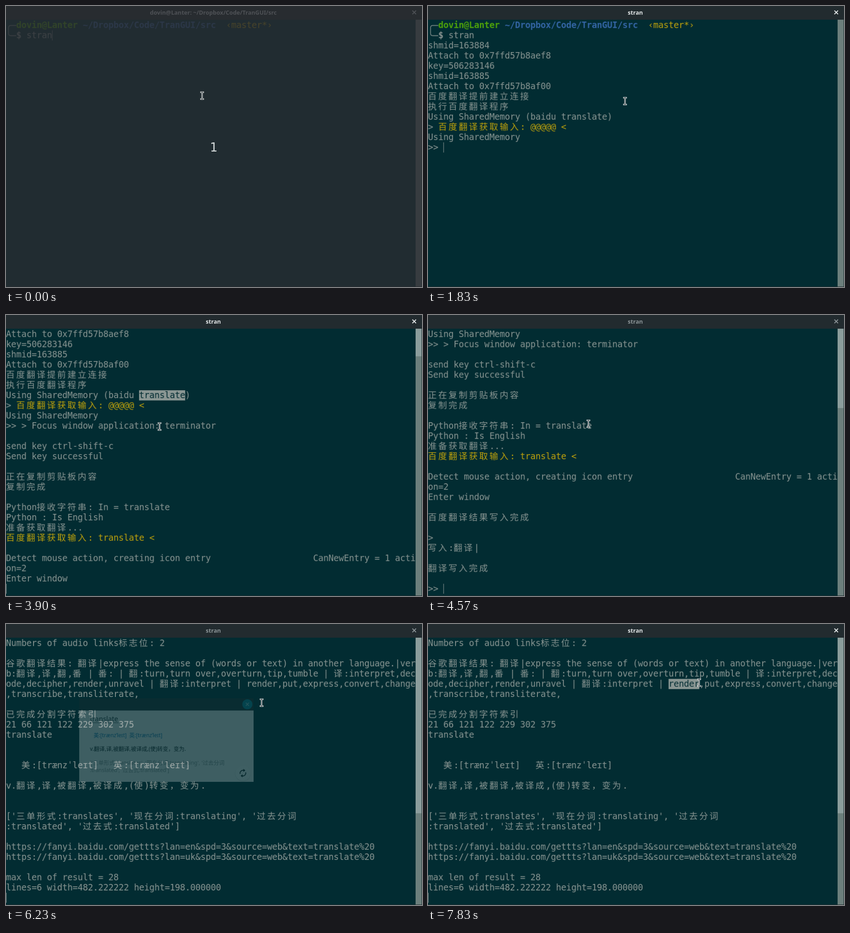
Recreate the animation shown at these times as an HTML page with a canvas. Size 909 by 616 pixels, loop 8000 ms.

```html
<!DOCTYPE html>
<html lang="en">
<head>
<meta charset="utf-8">
<title>Terminal translation</title>
<style>
html, body { margin: 0; width: 100%; height: 100%; overflow: hidden; background: #022c32; }
canvas { display: block; width: 909px; height: 616px; }
</style>
</head>
<body>
<canvas id="stage" width="909" height="616"></canvas>
<script>
const LOOP = 8000, ROWS = 26, COLS = 80;
// The terminal grid is laid out in whole pixels, then scaled slightly onto the stage.
const CELL_W = 11, CELL_H = 22, BASELINE = 17, SIZE = 18.67;
const SCALE_X = 909 / 894, SCALE_Y = 616 / 607, GRID_TOP = 31;
const BG = '#022c32', FG = '#8a9693', GREEN = '#4ea30a', BLUE = '#3465a4', YELLOW = '#c0a30c', BAR = '#222b2f';
const MONO = '"DejaVu Sans Mono", monospace';
const CJK = '"Noto Sans CJK SC", "Noto Sans CJK", sans-serif';
const UI = '"Noto Sans", "Noto Sans CJK SC", sans-serif';
const POPUP = { x: 126, y: 147, w: 449, h: 215 };

function makeLayer(width, height) {
  return Object.assign(document.createElement('canvas'), { width, height }).getContext('2d');
}

const stage = document.getElementById('stage').getContext('2d');
const grid = makeLayer(COLS * CELL_W, ROWS * CELL_H);
const popup = makeLayer(POPUP.w, POPUP.h);
let ctx = stage;

// A line is a string or a list of [text, color, weight].
const lines = [
  [['  '], ['dovin@Lanter ', GREEN, 'bold'], ['~/Dropbox/Code/TranGUI/src', BLUE, 'bold'], ['  ‹master*›', YELLOW]],
  [['  $', FG, 'bold'], [' stran']],
  'shmid=163884',
  'Attach to 0x7ffd57b8aef8',
  'key=506283146',
  'shmid=163885',
  'Attach to 0x7ffd57b8af00',
  '百度翻译提前建立连接',
  '执行百度翻译程序',
  'Using SharedMemory (baidu translate)',
  [['> '], ['百度翻译获取输入: @@@@@ <', YELLOW]],
  'Using SharedMemory',
  '>> > Focus window application: terminator',
  '',
  'send key ctrl-shift-c',
  'Send key successful',
  '',
  '正在复制剪贴板内容',
  '复制完成',
  '',
  'Python接收字符串: In = translate',
  'Python : Is English',
  '准备获取翻译...',
  [['百度翻译获取输入: translate <', YELLOW]],
  '',
  'Detect mouse action, creating icon entry'.padEnd(60) + 'CanNewEntry = 1 acti',
  'on=2',
  'Enter window',
  '',
  '百度翻译结果写入完成',
  '',
  '>',
  '写入:翻译|',
  '',
  '翻译写入完成',
  '',
  '>> ',
  ...Array(13).fill(''),
  'Numbers of audio links标志位: 2',
  '',
  '谷歌翻译结果: 翻译|express the sense of (words or text) in another language.|ver',
  'b:翻译,译,翻,番 | 番: | 翻:turn,turn over,overturn,tip,tumble | 译:interpret,dec',
  'ode,decipher,render,unravel | 翻译:interpret | render,put,express,convert,change',
  ',transcribe,transliterate,',
  '',
  '已完成分割字符索引',
  '21 66 121 122 229 302 375',
  'translate',
  '', '',
  '   美:[trænzˈleɪt]   英:[trænzˈleɪt]',
  '',
  'v.翻译,译,被翻译,被译成,(使)转变，变为.',
  '', '',
  "['三单形式:translates', '现在分词:translating', '过去分词",
  ":translated', '过去式:translated']",
  '',
  'https://fanyi.baidu.com/gettts?lan=en&spd=3&source=web&text=translate%20',
  'https://fanyi.baidu.com/gettts?lan=uk&spd=3&source=web&text=translate%20',
  '',
  'max len of result = 28',
  'lines=6 width=482.222222 height=198.000000',
  ''
];

// [time, line count, cursor column]; the last line is visible up to the cursor.
const output = [
  [0, 2, 9], [1330, 5, 0], [1370, 10, 0], [1770, 13, 3], [2670, 13, 5],
  [3730, 15, 0], [3800, 18, 0], [3870, 25, 0], [3900, 29, 0],
  [4100, 31, 0], [4230, 32, 1], [4300, 37, 3], [4700, 76, 0]
];

// [time, x, y] of the mouse
const path = [
  [0, 428, 196], [1640, 428, 196], [1970, 432, 216], [2600, 432, 216], [2870, 350, 231],
  [3300, 339, 243], [3730, 339, 243], [3900, 335, 244], [4300, 350, 238], [5000, 350, 238],
  [5130, 420, 222], [5240, 420, 222], [5530, 552, 183], [5640, 552, 183], [5870, 558, 172],
  [6470, 558, 172], [6800, 533, 125], [7000, 533, 125], [7030, 532, 125], [7140, 532, 125],
  [7230, 525, 134], [7390, 526, 132], [7800, 592, 128], [LOOP, 592, 128]
];

const between = (t, a, b) => t >= a && t < b;

function drawOn(layer, paint) {
  ctx = layer;
  ctx.save();
  paint();
  ctx.restore();
  ctx = stage;
}

function rect(x, y, w, h, color) {
  ctx.fillStyle = color;
  ctx.fillRect(x, y, w, h);
}

function label(text, x, y, font, color, align = 'left') {
  ctx.font = font;
  ctx.fillStyle = color;
  ctx.textAlign = align;
  ctx.fillText(text, x, y);
}

function disc(x, y, r, color) {
  ctx.fillStyle = color;
  ctx.beginPath();
  ctx.arc(x, y, r, 0, 7);
  ctx.fill();
}

function outline(shape, color, width) {
  ctx.strokeStyle = color;
  ctx.lineWidth = width;
  ctx.stroke(shape);
}

function cross(x, y, r, color, width) {
  outline(new Path2D(`M${x - r} ${y - r}l${2 * r} ${2 * r}m0 ${-2 * r}l${-2 * r} ${2 * r}`), color, width);
}

function mouseAt(t) {
  const i = path.findIndex(p => p[0] > t);
  const [t0, x0, y0] = path[i - 1], [t1, x1, y1] = path[i];
  const k = (t - t0) / (t1 - t0);
  return [x0 + (x1 - x0) * k, y0 + (y1 - y0) * k];
}

// Wide characters take two cells.
function drawLine(line, row, from = 0, to = COLS, override) {
  let col = 0;
  for (const [text, color = FG, weight = 'normal'] of Array.isArray(line) ? line : [[line]]) {
    for (const ch of text) {
      const wide = ch.codePointAt(0) > 0x2e80;
      if (col >= from && col < to && ch !== ' ')
        label(ch, col * CELL_W, row * CELL_H + BASELINE, `${weight} ${SIZE}px ${wide ? CJK : MONO}`, override || color);
      col += wide ? 2 : 1;
    }
  }
}

function select(index, top, from, to) {
  const row = index - top;
  if (row < 0 || to <= from) return;
  rect(from * CELL_W, row * CELL_H, (to - from) * CELL_W, CELL_H, FG);
  drawLine(lines[index], row, from, to, BG);
}

function drawGrid(t, mouseX, top, count, col) {
  rect(0, 0, COLS * CELL_W, ROWS * CELL_H, BG);
  for (let i = top; i < count; i++) drawLine(lines[i], i - top, 0, i === count - 1 ? col : COLS);

  if (top === 0)
    outline(new Path2D('M22 11.5H10Q5.5 11.5 5.5 16V29Q5.5 33.5 10 33.5H22'), FG, 1.4);
  if (between(t, 3500, 4700)) select(9, top, 26, 35);
  if (t >= 7390) select(54, top, 47, 47 + Math.min(6, Math.round((mouseX - 526) / CELL_W)));
  if (!between(t, 470, 1070) && !between(t, 2570, 2670))
    rect(col * CELL_W, (count - 1 - top) * CELL_H, 1, CELL_H, FG);
}

function drawTerminal(t, mouseX) {
  const [, count, col] = output.findLast(s => s[0] <= t);
  const top = Math.max(0, count - ROWS);
  rect(0, 0, 909, 616, BG);
  drawOn(grid, () => drawGrid(t, mouseX, top, count, col));
  ctx.drawImage(grid.canvas, 0, GRID_TOP, COLS * CELL_W * SCALE_X, ROWS * CELL_H * SCALE_Y);

  rect(895, 30, 13, 585, '#8b9d9c');
  const offset = 585 * top / Math.max(count, ROWS);
  rect(895, 30 + offset, 13, 585 - offset, '#6c7f7c');
  rect(908, 30, 1, 586, '#26383b');
  rect(0, 615, 909, 1, '#1f2c2f');

  const ink = between(t, 4470, 7370) ? '#8a9396' : '#e3e7e8';
  rect(0, 0, 909, 30, BAR);
  label(t < 1330 ? 'dovin@Lanter: ~/Dropbox/Code/TranGUI/src' : 'stran', 453, 18.5, `bold 12.6px ${UI}`, ink, 'center');
  cross(892, 14, 4, ink, 1.8);
}

function paintPopup(hover) {
  ctx.translate(-POPUP.x, -POPUP.y);
  rect(POPUP.x, POPUP.y, POPUP.w, POPUP.h, '#fafafa');
  rect(POPUP.x, POPUP.y, POPUP.w, 31, '#222d32');
  if (hover) disc(559, 162, 13, '#0e8ba3');
  cross(559, 162, 4, hover ? '#8fd3df' : '#e3e7e8', 1.8);

  const font = `14px ${UI}`;
  label('translate', 153.4, 206, `17.5px ${UI}`, '#263238');
  rect(153, 209, 74, 1, '#263238');
  label('美:[trænzˈleɪt]  英:[trænzˈleɪt]', 163, 247, `13.5px ${UI}`, '#0b72b5');
  label('v.翻译,译,被翻译,被译成,(使)转变，变为.', 153.4, 282, font, '#10181b');
  label("['三单形式:translates', '现在分词:translating', '过去分词", 153.4, 318, font, '#8c9294');
  label(":translated', '过去式:translated']", 153.4, 337, font, '#8c9294');

  disc(547.6, 340.8, 20.5, '#e6e8e8');
  disc(547.6, 339.8, 19.5, '#ffffff');
  ctx.translate(547.6, 339.8);
  for (let i = 0; i < 2; i++) {
    outline(new Path2D('M-7 2A7.3 7.3 0 0 1 2 -7'), '#10181b', 2);
    ctx.fillStyle = '#10181b';
    ctx.fill(new Path2D('M1 -11L6 -7L1 -3Z'));
    ctx.rotate(Math.PI);
  }
}

function drawPopup(t) {
  if (!between(t, 4680, 6300)) return;
  const opening = 1 - 2 ** (-10 * Math.min(1, (t - 4680) / 150));
  const closing = 1 - (1 - Math.max(0, (t - 6160) / 140)) ** 2;
  const scale = (0.8 + 0.2 * opening) * (1 - 0.2 * closing);
  drawOn(popup, () => paintPopup(t >= 5670));
  ctx.save();
  ctx.globalAlpha = opening * (1 - closing);
  ctx.translate(POPUP.x + POPUP.w / 2, POPUP.y + POPUP.h / 2);
  ctx.scale(scale, scale);
  ctx.drawImage(popup.canvas, -POPUP.w / 2, -POPUP.h / 2);
  ctx.restore();
}

function drawMouse(t, x, y) {
  ctx.save();
  ctx.translate(Math.round(x), Math.round(y));
  if (between(t, 5400, 6200)) {
    const arrow = new Path2D('M0.5 0.5V15L4 11.8L6.4 17.5L8.8 16.5L6.4 11H11Z');
    ctx.fillStyle = '#111';
    ctx.fill(arrow);
    outline(arrow, '#fff', 1.2);
  } else {
    const beam = new Path2D('M-2 -7H3M-2 8H3M0.5 -7V8');
    ctx.lineCap = 'square';
    outline(beam, '#f2f4f4', 3);
    outline(beam, '#182226', 1);
  }
  ctx.restore();
}

function draw(t) {
  const [x, y] = mouseAt(t);
  drawTerminal(t, x);
  drawPopup(t);
  if (t < 30) {
    rect(0, 0, 909, 616, 'rgba(42,44,49,.8)');
    label('1', 454, 318.5, '26px "DejaVu Sans", sans-serif', '#d8dddd', 'center');
  }
  drawMouse(t, x, y);
}

const start = performance.now();
function tick() {
  draw((performance.now() - start) % LOOP);
  requestAnimationFrame(tick);
}
tick();
</script>
</body>
</html>
```
